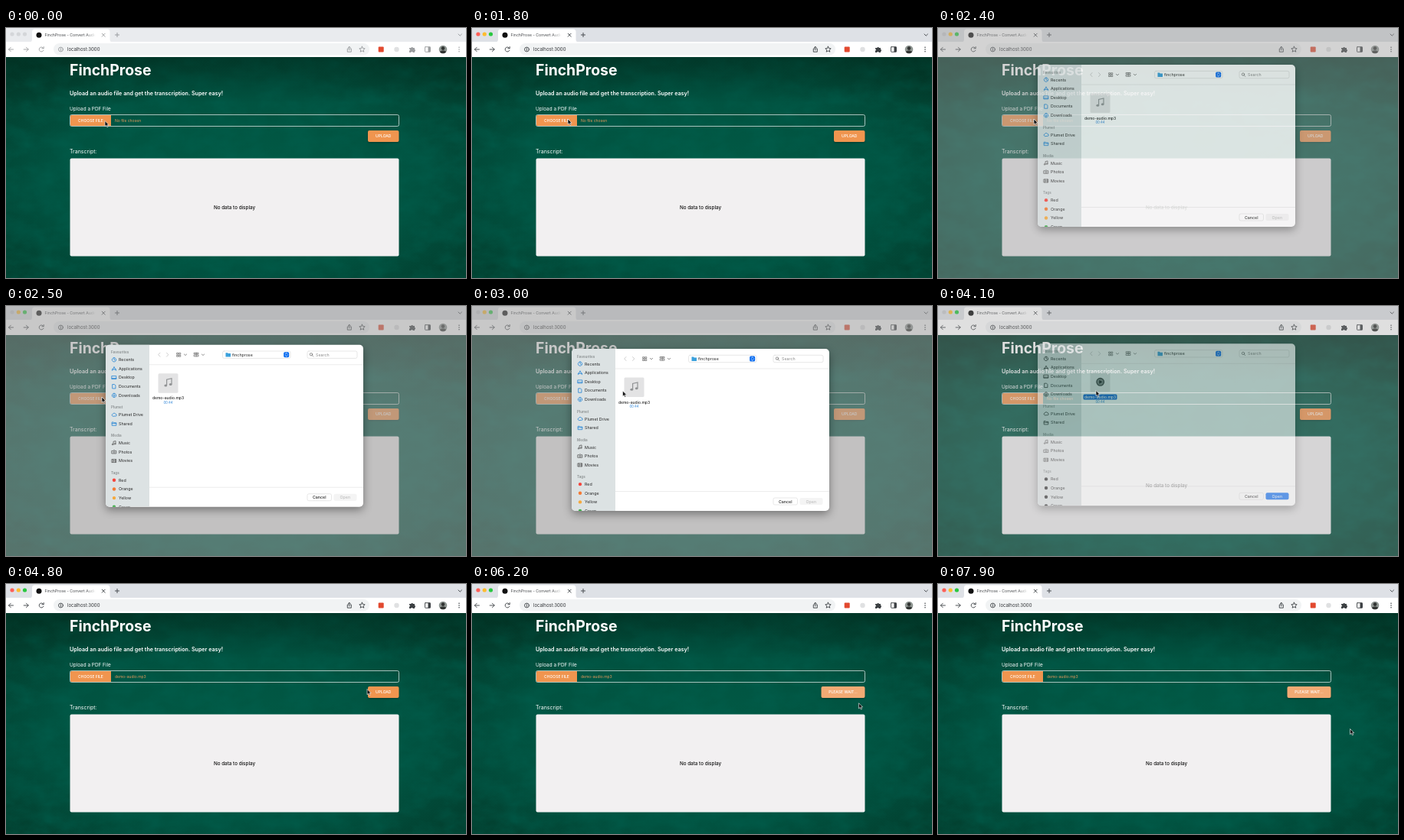
These frames come from a looping animation (600x327 px, 8000 ms). An HTML page:

```html
<!DOCTYPE html>
<html lang="en">
<head>
<meta charset="utf-8">
<title>FinchProse</title>
<style>
  html, body { margin: 0; width: 100%; height: 100%; overflow: hidden; background: #014a38; }
  svg { display: block; width: 100vw; height: 100vh; font-family: Inter, Roboto, sans-serif; }
  .mid { text-anchor: middle; }
  .line { fill: none; stroke: #3c4043; stroke-width: .9; stroke-linecap: round; stroke-linejoin: round; }
  .small { font-size: 5px; font-weight: 500; }
  .ui { font-size: 5.3px; fill: #262626; }
  .head { font-size: 4.6px; font-weight: 600; fill: #8b9091; }
  .thin { stroke-width: .7; stroke: #666; }
  .tint { stroke: var(--tint); }
  #dialog { --tint: #1a7fd4; }
  #dialog.closing { --tint: #222; }
  #dialog.closing .tag { fill: #222; }
  #window.idle .tool { opacity: .5; }
  #window.idle .light { fill: #d4d6d9; }
  #window.idle #strip { fill: #e9ebee; }
</style>
</head>
<body>
<svg viewBox="0 0 600 327" preserveAspectRatio="none">
  <defs>
    <radialGradient id="board" gradientTransform="translate(0 .06)" cx=".5" cy=".5" r=".68">
      <stop offset="0" stop-color="#015b46"/>
      <stop offset=".6" stop-color="#015240"/>
      <stop offset="1" stop-color="#023b2b"/>
    </radialGradient>
    <linearGradient id="topShade" x2="0" y2="1">
      <stop stop-color="#012c1f" stop-opacity=".55"/>
      <stop offset="1" stop-color="#012c1f" stop-opacity="0"/>
    </linearGradient>
    <linearGradient id="titleFade">
      <stop stop-color="#fff" stop-opacity="0"/>
      <stop offset="1" stop-color="#fff"/>
    </linearGradient>
    <filter id="chalk" x="0" y="0" width="1" height="1">
      <feTurbulence type="fractalNoise" baseFrequency=".03 .05" numOctaves="5" seed="4"/>
      <feColorMatrix values="0 0 0 0 0  0 0 0 0 .12  0 0 0 0 .08  .9 0 0 0 -.3"/>
    </filter>
    <clipPath id="sheet"><rect x="130" y="56" width="336" height="212" rx="5"/></clipPath>
    <clipPath id="face"><circle cx="570" cy="28" r="5.3"/></clipPath>
  </defs>

  <g id="page">
    <rect y="38" width="600" height="289" fill="url(#board)"/>
    <rect y="38" width="600" height="289" filter="url(#chalk)"/>
    <rect y="38" width="600" height="60" fill="url(#topShade)"/>
    <g fill="#fff">
      <text x="83" y="62.3" font-size="19.4" font-weight="700">FinchProse</text>
      <text x="83" y="88.4" font-size="7.15" font-weight="600">Upload an audio file and get the transcription. Super easy!</text>
      <text x="83" y="107.6" font-size="6.4">Upload a PDF File</text>
      <text x="83" y="163.6" font-size="7">Transcript:</text>
    </g>
    <rect x="83.5" y="113.5" width="429" height="15" rx="2" fill="none" stroke="#d5dfdb" stroke-width=".8"/>
    <path d="M137 114V128H85.5Q84 128 84 126.500V115.500Q84 114 85.500 114Z" fill="#f0954f"/>
    <text class="small mid" x="110.5" y="123.200" fill="#fff">CHOOSE FILE</text>
    <text id="fileName" x="142" y="123.200" font-size="5" fill="#eb9a5c"></text>
    <rect id="upload" y="134" height="15" rx="2" style="filter:drop-shadow(0 1px 1px #0005)"/>
    <text id="uploadText" class="small mid" y="143.400" fill="#fff"></text>
    <rect x="83.5" y="170.500" width="429" height="128" rx="2" fill="#f2f0f1"/>
    <text class="mid" x="298" y="237" font-size="6.300" font-weight="500" fill="#111">No data to display</text>
  </g>

  <g id="window">
    <rect id="strip" width="600" height="19" fill="#dee1e6"/>
    <circle id="red" class="light" cx="8" cy="8" r="2.600" fill="#fe5f57"/>
    <circle class="light" cx="16.300" cy="8" r="2.600" fill="#febc2e"/>
    <circle class="light" cx="24.500" cy="8" r="2.600" fill="#28c840"/>
    <path d="M30 18.500Q34 18.500 34 15V5Q34 1.500 37.500 1.500H132Q135.500 1.500 135.500 5V15Q135.500 18.500 139.500 18.500Z" fill="#fff"/>
    <rect y="18" width="600" height="20" fill="#fff"/>
    <circle cx="43" cy="9.200" r="3.500" fill="#111"/>
    <text x="50.500" y="11.100" font-size="5.200" fill="#45484b">FinchProse - Convert Audio</text>
    <rect x="104" y="4" width="13" height="11" fill="url(#titleFade)"/>
    <rect x="117" y="4" width="8" height="11" fill="#fff"/>
    <rect x="62" y="20" width="412" height="15.500" rx="7.750" fill="#f1f3f4"/>
    <text x="80" y="30.200" font-size="6" fill="#303336">localhost:3000</text>
    <g class="tool">
      <g class="line">
        <path d="M125.200 7.200l4 4m0-4l-4 4M145 6.400v5.200m-2.600-2.600h5.200M590 8l2.200 2.200L594.400 8"/>
        <path d="M9.500 28H3.500m2.800-2.800L3.500 28l2.800 2.800M23.200 28h6m-2.800-2.800L29.200 28l-2.800 2.800"/>
        <path d="M48.800 26.400A3 3 0 1 0 49 29.200M49.200 24.500v2.300h-2.300"/>
        <circle cx="71.500" cy="28" r="2.900"/>
        <path d="M71.500 27.700v1.700m0-3v.1"/>
        <path d="M446.500 27h-1.200v4.200h5V27h-1.200M447.800 29v-4.600m-1.400 1.300l1.400-1.400l1.400 1.400"/>
        <path d="M464.500 24.200l1.100 2.400l2.600.3l-2 1.700l.6 2.600l-2.300-1.300l-2.300 1.300l.6-2.600l-2-1.700l2.600-.3Z"/>
        <rect x="546.500" y="24.700" width="7" height="6.600" rx=".6"/>
      </g>
      <path d="M550.500 24.700h3v6.600h-3Z" fill="#3c4043"/>
      <path d="M526 26h2.300a1.400 1.400 0 0 1 2.700 0h2v2.100a1.400 1.400 0 0 1 0 2.700V32h-2.300a1.300 1.300 0 0 0-2.500 0H526v-2.300a1.300 1.300 0 0 0 0-2.500Z" fill="#3c4043"/>
      <g fill="#3c4043"><circle cx="591" cy="25.300" r=".8"/><circle cx="591" cy="28" r=".8"/><circle cx="591" cy="30.700" r=".8"/></g>
    </g>
    <rect x="485.700" y="24.500" width="7" height="7" rx="1" fill="#e2492f"/>
    <circle cx="509.500" cy="28" r="3.200" fill="#e0e1e2"/>
    <g clip-path="url(#face)">
      <rect x="564" y="22" width="12" height="12" fill="#8f9692"/>
      <circle cx="570" cy="26.600" r="2.300" fill="#303331"/>
      <ellipse cx="570" cy="33" rx="4.500" ry="3.600" fill="#303331"/>
    </g>
  </g>

  <rect id="dim" width="600" height="327" fill="#9b9b9b"/>

  <g id="dialog">
    <rect x="130" y="56" width="336" height="212" rx="5" fill="#fff" style="filter:drop-shadow(0 4px 6px #0006)"/>
    <g clip-path="url(#sheet)">
      <rect x="130" y="56" width="57" height="212" fill="#dce2e3"/>
      <path d="M187 82H466M187 242.500H466" stroke="#e4e4e4" stroke-width=".7"/>
      <g id="sidebar"></g>
    </g>
    <g class="line thin">
      <path d="M201 66.500l-2.300 2.500l2.300 2.500M209.500 66.500l2.300 2.500l-2.300 2.500" stroke="#bbb"/>
      <path d="M223 66.700h1.800v1.800h-1.800Zm3 0h1.800v1.800H226Zm-3 3h1.800v1.800h-1.800Zm3 0h1.800v1.800H226ZM232.300 68.300l1.700 1.600l1.700-1.600"/>
      <path d="M245.500 66.500h5.500v1.500h-5.500Zm0 2.700h5.500v2h-5.500ZM248.200 66.500v4.700M255.300 68.300l1.700 1.600l1.700-1.600"/>
      <rect x="282.500" y="64.300" width="88.500" height="9.400" rx="2" stroke="#ddd"/>
      <rect x="393" y="64.300" width="65" height="9.400" rx="2" stroke="#ddd"/>
      <circle cx="398" cy="68.600" r="1.700"/>
      <path d="M399.300 69.900l1.500 1.500"/>
    </g>
    <path d="M286.500 66.500h2.500l.8.900h3.200v4.500h-6.500Z" fill="#3aa0dc"/>
    <text class="ui" x="295" y="70.900">finchprose</text>
    <rect x="362.200" y="65.500" width="7" height="7" rx="1.600" fill="#0a6cf0"/>
    <path class="line" d="M364.300 68.200l1.400-1.300l1.400 1.300m-2.800 1.700l1.400 1.300l1.400-1.300" style="stroke:#fff;stroke-width:.7"/>
    <text class="ui" x="404" y="70.900" style="fill:#8a8a8a">Search</text>

    <rect x="198.500" y="93.500" width="26" height="25.500" rx="1.500" fill="#e3e3e4"/>
    <g id="note">
      <path d="M209.600 109V101.500L216 100v7.500" fill="none" stroke="#919395" stroke-width="1.200"/>
      <ellipse cx="208.300" cy="109.200" rx="1.900" ry="1.500" fill="#919395"/>
      <ellipse cx="214.700" cy="107.700" rx="1.900" ry="1.500" fill="#919395"/>
    </g>
    <g id="play">
      <circle cx="211.700" cy="106" r="4.800" fill="#777" stroke="#333" stroke-width="1.300"/>
      <path d="M210.300 103.600l4 2.400l-4 2.400Z" fill="#111"/>
    </g>
    <rect id="highlight" x="189.500" y="122.300" width="44" height="7" rx="1.500" fill="#0a62d8"/>
    <text id="file" class="small mid" x="211.500" y="127.500">demo-audio.mp3</text>
    <text class="mid" x="211.500" y="133.400" font-size="4.300" fill="#2f86d8">00:44</text>

    <rect x="393" y="251" width="31.500" height="9" rx="2" fill="#fff" stroke="#d8d8d8" stroke-width=".6"/>
    <text class="ui mid" x="408.700" y="257.500" font-weight="500">Cancel</text>
    <rect id="openButton" x="427.500" y="251" width="30" height="9" rx="2"/>
    <text id="openText" class="ui mid" x="442.300" y="257.500">Open</text>
  </g>

  <path id="pointer" d="M0 0V7.200L1.700 5.700L2.900 8.300L4.100 7.800L3 5.200H5.200Z" fill="#111" stroke="#fff" stroke-width=".6"/>
</svg>

<script>
const $ = id => document.getElementById(id);
const LOOP = 8000;

// Icons are drawn around their own centre.
const icons = {
  clock: 'M0-2.700A2.700 2.700 0 1 1 -.01-2.700M0-1.600V0L1.300.7',
  apps: 'M-2.500 2.500L0-2.500L2.500 2.500M-2.800 1H2.800',
  desktop: 'M-2.800-2H2.800V2H-2.800ZM-2.800 .9H2.800',
  doc: 'M-1.900-2.700H.6L1.900-1.300V2.700H-1.900Z',
  down: 'M0-2.700A2.700 2.700 0 1 1 -.01-2.700M0-1.400V1.300M-1.100 .2L0 1.300L1.100 .2',
  cloud: 'M-2 1.800A1.500 1.500 0 0 1 -1.700-1A2 2 0 0 1 2-.8A1.300 1.300 0 0 1 2 1.800Z',
  shared: 'M-2.800 2V-2H-.8L-.2-1.200H2.800V2ZM-2.800-.3H2.800',
  music: 'M-1 1.800V-2L2-2.700V1.100M-1 1.800A.9 .8 0 1 1 -1.100 1.300M2 1.100A.9 .8 0 1 1 1.900 .6',
  camera: 'M-2.800-1.500H-1.300L-.7-2.300H.7L1.300-1.500H2.800V2H-2.800ZM0-.9A1.100 1.100 0 1 1 -.01-.9',
  film: 'M-2.800-2H2.800V2H-2.800ZM-1.500-2V2M1.500-2V2M-1.500 0H1.500'
};

const sections = [
  ['Favourites', 66, [['Recents', 'clock'], ['Applications', 'apps'], ['Desktop', 'desktop'], ['Documents', 'doc'], ['Downloads', 'down']]],
  ['Plumet', 138, [['Plumet Drive', 'cloud'], ['Shared', 'shared']]],
  ['Media', 175, [['Music', 'music'], ['Photos', 'camera'], ['Movies', 'film']]],
  ['Tags', 223.500, [['Red', '#f5453d'], ['Orange', '#f47a33'], ['Yellow', '#f5a93c'], ['Green', '#3fae49']]]
];

const sidebarRow = ([label, mark], y, group) => {
  const stroke = group === 'Media' ? '#555' : 'var(--tint)';
  const symbol = icons[mark]
    ? `<path class="line" d="${icons[mark]}" transform="translate(141 ${y})" style="stroke:${stroke};stroke-width:.75"/>`
    : `<circle class="tag" cx="141" cy="${y}" r="2.200" fill="${mark}"/>`;
  return `${symbol}<text class="ui" x="147" y="${y + 1.900}">${label}</text>`;
};

$('sidebar').innerHTML = sections.map(([group, y, rows]) =>
  `<text class="head" x="137" y="${y + 1.600}">${group}</text>` +
  rows.map((row, i) => sidebarRow(row, y + 9.600 + i * 11.650, group)).join('')
).join('');

const pointerPath = [
  [0, 129, 121.500], [800, 129, 121.500], [1500, 125, 119], [2500, 125, 119],
  [2950, 196.500, 111], [3050, 196.500, 111], [3350, 206, 110.500], [4200, 206, 110.500],
  [4800, 471, 137.500], [5200, 489, 140], [5900, 489, 140], [6700, 537.500, 189.500], [LOOP, 537.500, 189.500]
];

const ramp = (t, from, to) => Math.min(1, Math.max(0, (t - from) / (to - from)));
const show = (id, on) => $(id).setAttribute('visibility', on ? 'visible' : 'hidden');
const set = (id, attrs) => Object.entries(attrs).forEach(([key, value]) => $(id).setAttribute(key, value));

function pointerAt(t) {
  const i = pointerPath.findIndex(p => p[0] > t);
  const [t0, x0, y0] = pointerPath[i - 1], [t1, x1, y1] = pointerPath[i];
  const p = ramp(t, t0, t1), ease = p * p * (3 - 2 * p);
  return [x0 + (x1 - x0) * ease, y0 + (y1 - y0) * ease];
}

function draw(t) {
  const closing = ramp(t, 3850, 4450);
  const alpha = ramp(t, 2160, 2460) * (1 - closing);
  const drop = ramp(t, 2100, 2700) - closing;
  const selected = t >= 3300;
  const waiting = t >= 5800;

  $('window').classList.toggle('idle', t < 800);
  $('red').style.fill = alpha > 0 ? '#c9cbce' : '';
  set('dim', { opacity: alpha * .55 });

  set('dialog', { opacity: alpha, transform: `translate(0 ${-16 * (1 - drop)})` });
  show('dialog', alpha > 0);
  $('dialog').classList.toggle('closing', closing > 0);
  const inDialog = alpha > 0;
  show('play', inDialog && selected);
  show('note', inDialog && !selected);
  show('highlight', inDialog && selected);
  set('file', { fill: selected ? '#fff' : '#262626' });
  set('openButton', { fill: selected ? '#0a6cf0' : '#f4f4f4' });
  $('openText').style.fill = selected ? '#fff' : '#b5b5b5';

  $('fileName').textContent = t < 4300 ? 'No file chosen' : 'demo-audio.mp3';
  const left = waiting ? 455.500 : 472;
  set('upload', { x: left, width: 512.500 - left, fill: waiting ? '#f2aa74' : '#f0954f' });
  set('uploadText', { x: (left + 512.500) / 2 });
  $('uploadText').textContent = waiting ? 'PLEASE WAIT...' : 'UPLOAD';

  set('pointer', { transform: `translate(${pointerAt(t)})` });
}

const start = performance.now();
function tick() {
  draw((performance.now() - start) % LOOP);
  requestAnimationFrame(tick);
}
tick();
</script>
</body>
</html>
```
